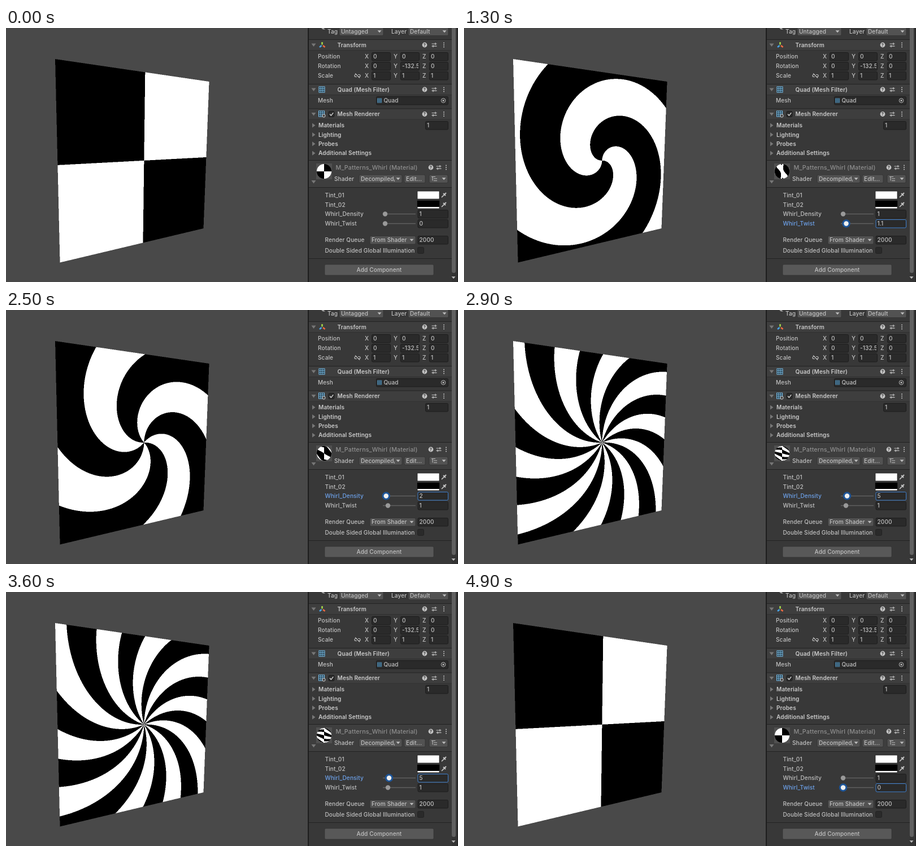
An HTML page with a canvas that plays this animation: 800 by 450 pixels, repeating every 5000 ms.

```html
<!DOCTYPE html>
<html lang="en">
<head>
<meta charset="utf-8">
<title>Whirl pattern inspector</title>
<style>
  html, body { margin: 0; width: 100%; height: 100%; overflow: hidden; background: #494949; }
  svg, canvas { position: absolute; left: 0; top: 0; width: 800px; height: 450px; }
  text { font: 500 10.05px Inter, "Open Sans", sans-serif; letter-spacing: .12px; fill: #c2c2c2; white-space: pre; }
  .b { font-weight: 600; fill: #cacaca; }
  .title { font-size: 10.7px; fill: #8f8f8f; }
  .on { fill: #6ea3ec; }
</style>
</head>
<body>
<svg id="ui" viewBox="0 0 800 450"></svg>
<canvas id="view" width="800" height="450"></canvas>
<script>
const LOOP = 5000, STEP = 100;
const ui = document.getElementById('ui');
const ctx = document.getElementById('view').getContext('2d');

// ---- inspector panel ----
const parts = [];
const add = s => parts.push(s);
const rect = (x, y, w, h, fill, more = '') =>
  add(`<rect x="${x}" y="${y}" width="${w}" height="${h}" fill="${fill}" ${more}/>`);
const path = (d, color, width = 1, more = '') =>
  add(`<path d="${d}" fill="none" stroke="${color}" stroke-width="${width}" ${more}/>`);
const shape = (d, fill) => add(`<path d="${d}" fill="${fill}"/>`);
const dot = (x, y, r, fill, more = '') => add(`<circle cx="${x}" cy="${y}" r="${r}" fill="${fill}" ${more}/>`);
// y is the middle of the line
const text = (x, y, s, cls = '', more = '') =>
  add(`<text x="${x}" y="${y + 3.6}" class="${cls}" ${more}>${s}</text>`);

const line = y => rect(536, y, 253, 1, '#222');
const field = (x, y, w, s = '', id = '') => {
  rect(x + .5, y - 7, w - 1, 14.5, '#2a2a2a', `stroke="#1d1d1d" rx="2" ${id && `id="${id}Box"`}`);
  text(x + 3, y, s, '', id && `id="${id}Val"`);
};
const down = (x, y) => shape(`M${x - 3.5} ${y - 1.8}h7l-3.5 4z`, '#bdbdbd');
const button = (x, y, w, s = '', arrow = true) => {
  rect(x, y - 7, w, 14.5, '#525252', 'rx="2" stroke="#303030" stroke-width=".8"');
  text(x + 3, y, s);
  if (arrow) down(x + w - 7, y);
};
const fold = (x, y, open) =>
  shape(open ? `M${x - 4} ${y - 2.5}h8l-4 5.5z` : `M${x - 2.5} ${y - 4}v8l5.5 -4z`, '#777');

function tools(y, xs = [741, 758, 775]) {
  const [a, b, c] = xs;
  dot(a, y, 4.4, '#c4c4c4');
  add(`<text x="${a}" y="${y + 2.8}" text-anchor="middle" style="font-size:7.5px;font-weight:700;fill:#383838">?</text>`);
  path(`M${b - 4.5} ${y - 2}h9M${b - 4.5} ${y + 2.2}h9M${b + 2} ${y - 4}v4M${b - 2} ${y + .2}v4`, '#c4c4c4', 1.2);
  for (const d of [-3.5, 0, 3.5]) dot(c, y + d, 1, '#c4c4c4');
}
function header(y, s) {
  rect(536, y - 10, 253, 20, '#3e3e3e');
  line(y - 10);
  rect(536, y + 9, 253, 1, '#303030');
  fold(544.5, y, true);
  text(586.5, y, s, 'b');
  tools(y);
}
function grid(x, y, s, color) {
  const h = s / 2, q = s / 6;
  rect(x - h, y - h, s, s, '#24333d', `stroke="${color}"`);
  path(`M${x - q} ${y - h}v${s}M${x + q} ${y - h}v${s}M${x - h} ${y - q}h${s}M${x - h} ${y + q}h${s}`, color, .9);
}
function picker(x, y) {
  path(`M${x - 4} ${y + 4}l5 -5`, '#c4c4c4', 1.7);
  path(`M${x - 1} ${y - 3}l4 4M${x + 1} ${y - 1}l3 -3`, '#c4c4c4', 2);
}
function slider(y, label, id) {
  text(564.5, y, label, '', `id="${id}Label"`);
  rect(667, y - .7, 58, 1.4, '#626262');
  dot(671, y, 7.2, '#1d5599', `id="${id}Halo"`);
  dot(671, y, 4.2, '#999', `id="${id}Knob"`);
  field(728.5, y, 54.5, '', id);
}

rect(0, 0, 800, 450, '#494949');
rect(534, 0, 266, 450, '#383838');
rect(534, 0, 2, 450, '#1e1e1e');
rect(789, 0, 11, 450, '#333');
rect(789, -6, 7, 440, '#606060', 'rx="3.5"');
rect(799, 0, 1, 450, '#1e1e1e');
down(792, 442);

shape('M558 0h4l3 2.5h-4z', '#aaa');
text(569, 6.5, 'Tag');
button(590, 6, 78, 'Untagged');
text(682, 6.5, 'Layer');
button(712, 6, 71, 'Default');

header(30, 'Transform');
path('M559.5 29.5v-4.5', '#a5d84a', 2.6);
path('M558.5 31l-3.5 3', '#4aa5e8', 2.6);
path('M561 31l3.5 3', '#ef6b42', 2.6);

['Position', 'Rotation', 'Scale'].forEach((name, i) => {
  const y = 50.5 + 17 * i;
  text(552, y, name);
  ['X', 'Y', 'Z'].forEach((axis, k) => {
    const x = 647 + 51 * k;
    text(x - 12, y, axis);
    rect(x + .5, y - 7, 33, 14.5, '#2a2a2a', 'stroke="#1d1d1d" rx="2"');
    const v = i === 2 ? '1' : i === 1 && k === 1 ? '-132.5' : '0';
    add(`<svg x="${x}" y="${y - 7}" width="32" height="15"><text x="3" y="10.6">${v}</text></svg>`);
  });
});
path('M621 82.5h-2a2 2 0 0 0 0 4h2M623 82.5h2a2 2 0 0 1 0 4h-2M618 80.5l8 8', '#bdbdbd', 1.2);

header(109, 'Quad (Mesh Filter)');
grid(559, 109, 10, '#7cc4ef');
text(552, 128.5, 'Mesh');
field(655, 128.5, 128);
grid(661, 128.5, 7, '#4f88ac');
text(668.5, 128.5, 'Quad');
dot(774, 128.5, 3.8, 'none', 'stroke="#bdbdbd"');
dot(774, 128.5, 1.6, '#bdbdbd');

header(152.5, 'Mesh Renderer');
grid(558.5, 152, 10, '#7cc4ef');
dot(562.5, 155.5, 2.6, '#3e3e3e', 'stroke="#ddd"');
rect(571, 147.5, 10, 10, '#2a2a2a', 'rx="2" stroke="#1d1d1d"');
path('M573 152.5l2.3 2.6l4 -5', '#d2d2d2', 1.5);

['Materials', 'Lighting', 'Probes', 'Additional Settings'].forEach((s, i) => {
  const y = 172.5 + 16.4 * i;
  fold(544.5, y, false);
  text(553, y, s, 'b');
});
field(742, 172.5, 41, '1');

rect(536, 234, 253, 48, '#3e3e3e');
line(234);
line(282);
rect(549, 240, 28, 28, '#505050');
text(583.5, 247, 'M_Patterns_Whirl (Material)', 'title');
tools(247, [752, 766, 779]);
fold(544.5, 272.5, true);
text(581, 267, 'Shader');
button(625, 267, 76);
add('<svg x="625" y="259" width="63" height="17"><text x="3" y="11.6">Decompiled/Whirl</text></svg>');
button(705, 267, 37, 'Edit...', false);
button(749, 267, 33);
path('M753 263.5h7M757 267h6M757 270.5h6M755 263.5v7', '#bdbdbd', 1.1);

['Tint_01', 'Tint_02'].forEach((s, i) => {
  const y = 296 + 17 * i;
  text(564.5, y, s);
  rect(728, y - 7, 39, 14, '#fff', 'stroke="#222" stroke-width=".8"');
  if (i) rect(728, y - 7, 39, 11, '#000');
  picker(775, y);
});
slider(329.5, 'Whirl_Density', 'density');
slider(346.5, 'Whirl_Twist', 'twist');

text(564.5, 375.5, 'Render Queue');
button(644, 375.5, 81, 'From Shader');
field(728.5, 375.5, 54.5, '2000');
text(564.5, 394, 'Double Sided Global Illumination');
rect(728.5, 388.5, 11, 11, '#2a2a2a', 'rx="2" stroke="#222"');
line(408);
rect(564, 419, 193, 19, '#585858', 'rx="2" stroke="#303030" stroke-width=".6"');
text(660.5, 428.3, 'Add Component', '', 'text-anchor="middle"');
ui.innerHTML = parts.join('');

// ---- whirl pattern ----
// map(x, y) gives centred surface coordinates, or null outside;
// each pixel is the mean of four samples
function surface(x0, y0, w, h, map) {
  const img = ctx.createImageData(w, h), cells = [];
  const offsets = [[.25, .25], [.75, .25], [.25, .75], [.75, .75]];
  for (let i = 0; i < w * h; i++) {
    const x = x0 + i % w, y = y0 + Math.floor(i / w);
    const hits = offsets.map(([dx, dy]) => map(x + dx, y + dy)).filter(Boolean);
    if (hits.length) cells.push([i * 4, hits.map(([u, v]) => [Math.atan2(v, u), Math.hypot(u, v)])]);
  }
  return (density, twist) => {
    for (const [i, samples] of cells) {
      let white = 0;
      for (const [angle, r] of samples)
        if (Math.sin(2 * (density * angle + 2 * Math.PI * twist * r)) > 0) white++;
      img.data.fill(255 * white / samples.length, i, i + 3);
      img.data[i + 3] = 255 * samples.length / 4;
    }
    ctx.putImageData(img, x0, y0);
  };
}

// inverse perspective for a quad given as TL, TR, BR, BL
function unproject([[x0, y0], [x1, y1], [x2, y2], [x3, y3]]) {
  const ax = x1 - x2, bx = x3 - x2, cx = x0 - x1 + x2 - x3;
  const ay = y1 - y2, by = y3 - y2, cy = y0 - y1 + y2 - y3;
  const det = ax * by - bx * ay;
  const g = (cx * by - bx * cy) / det, h = (ax * cy - cx * ay) / det;
  const a = x1 - x0 + g * x1, b = x3 - x0 + h * x3;
  const d = y1 - y0 + g * y1, e = y3 - y0 + h * y3;
  return (x, y) => {
    const m = a - g * x, n = b - h * x, p = d - g * y, q = e - h * y;
    const k = m * q - n * p;
    const u = ((x - x0) * q - n * (y - y0)) / k - .5;
    const v = .5 - (m * (y - y0) - p * (x - x0)) / k;
    return Math.abs(u) <= .5 && Math.abs(v) <= .5 ? [u, v] : null;
  };
}

// sphere whose texture seam faces the viewer
function ball(cx, cy, r) {
  return (x, y) => {
    const nx = (x - cx) / r, ny = (cy - y) / r, zz = 1 - nx * nx - ny * ny;
    if (zz < 0) return null;
    const turn = Math.atan2(nx, Math.sqrt(zz)) / (2 * Math.PI);
    return [turn < 0 ? turn + .5 : turn - .5, Math.asin(ny) / Math.PI];
  };
}

const paintQuad = surface(84, 52, 280, 368,
  unproject([[87, 55], [359.5, 95], [349.5, 355], [95.5, 415.5]]));
const paintBall = surface(549, 240, 28, 28, ball(563, 254, 13));

// ---- timing ----
const twistKeys = [[200, 0], [800, .9], [1800, 1.2], [2100, 1], [4300, 1], [4800, 0]];
const densityKeys = [[2400, 1], [2800, 5], [3700, 5], [4100, 1]];
const focusKeys = [[0, ''], [200, 'twist'], [2300, 'density'], [4300, 'twist']];

function at(keys, t) {
  const i = keys.findIndex(k => k[0] > t);
  if (i === 0) return keys[0][1];
  if (i < 0) return keys[keys.length - 1][1];
  const [t0, a] = keys[i - 1], [t1, b] = keys[i];
  return a + (b - a) * (t - t0) / (t1 - t0);
}

const el = id => document.getElementById(id);
function control(id, value, x, on) {
  el(id + 'Label').setAttribute('class', on ? 'on' : '');
  el(id + 'Val').textContent = value;
  el(id + 'Box').setAttribute('stroke', on ? '#3f80cf' : '#1d1d1d');
  el(id + 'Halo').setAttribute('visibility', on ? 'visible' : 'hidden');
  el(id + 'Halo').setAttribute('cx', x);
  el(id + 'Knob').setAttribute('cx', x);
  el(id + 'Knob').setAttribute('fill', on ? '#f0f0f0' : '#999');
}

let shown = '';
function draw(t) {
  const twist = Math.round(at(twistKeys, t) * 10) / 10;
  const density = Math.round(at(densityKeys, t));
  const focus = focusKeys.filter(k => k[0] <= t).pop()[1];
  const state = [twist, density, focus].join();
  if (state === shown) return;
  shown = state;
  control('density', density, 671 + (density - 1) * 1.75, focus === 'density');
  control('twist', twist, 671 + twist * 5, focus === 'twist');
  paintQuad(density, twist);
  paintBall(density, twist);
}

const start = performance.now();
function tick() {
  const t = (performance.now() - start) % LOOP;
  draw(Math.floor(t / STEP) * STEP);
  requestAnimationFrame(tick);
}
tick();
</script>
</body>
</html>
```
